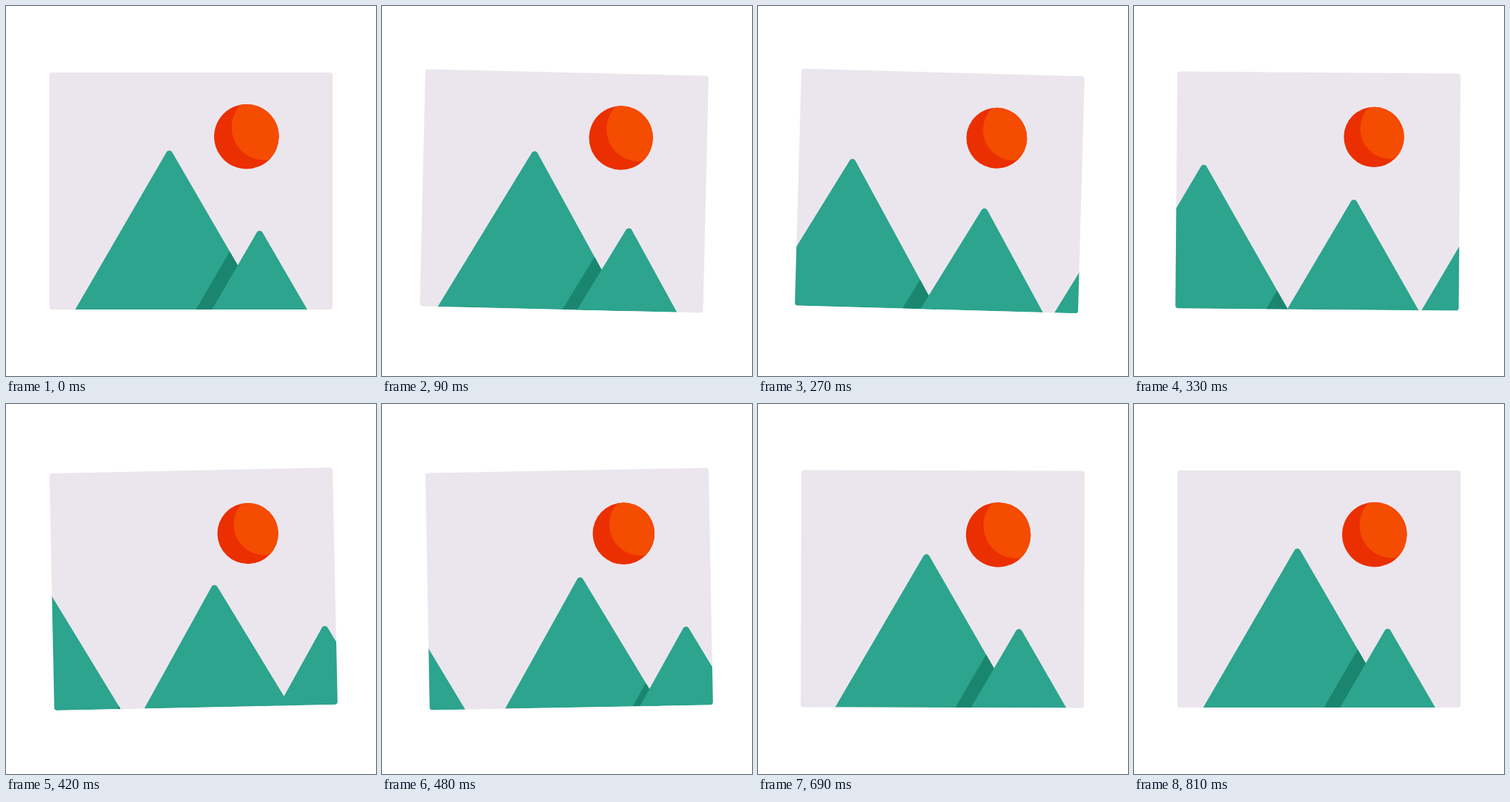
Write an HTML page with a canvas that moves like this. It is 512 px wide and 512 px high and loops after 840 ms.

```html
<!DOCTYPE html>
<html lang="en">
<head>
<meta charset="utf-8">
<title>Gallery icon</title>
<style>
  html, body { margin: 0; width: 100%; height: 100%; overflow: hidden; background: #fff; }
  canvas { display: block; }
</style>
</head>
<body>
<canvas id="stage" width="512" height="512"></canvas>
<script>
const ctx = document.getElementById('stage').getContext('2d');

const LOOP = 840, STEP = 30, TRAVEL = 810;
const CARD = { x: 60, y: 92, w: 392, h: 328 };
const BASE = CARD.y + CARD.h;
const SLOPE = 0.58; // half width per unit of height
const GREEN = '#2ca48e', SHADE = '#1b866f';
const BIG = { x: 226, h: 224.5 }, SMALL = { x: 351, h: 113.5 };

const clamp = v => Math.min(1, Math.max(0, v));
const mix = (a, b, p) => a + (b - a) * p;
const smooth = p => p * p * (3 - 2 * p);

// Timing curve with control points (x1, 0) and (x2, 1).
const bezier = (x1, x2) => p => {
  let lo = 0, hi = 1;
  for (let i = 0; i < 24; i++) {
    const u = (lo + hi) / 2, v = 1 - u;
    if (3 * v * v * u * x1 + 3 * v * u * u * x2 + u * u * u < p) lo = u;
    else hi = u;
  }
  return smooth((lo + hi) / 2);
};

const grow = bezier(0.24, 0.73);

// Keys are [time, value, easing towards this key].
function track(keys, t) {
  for (let i = 1; i < keys.length; i++) {
    const [t0, a] = keys[i - 1], [t1, b, ease = smooth] = keys[i];
    if (t < t1) return mix(a, b, ease((t - t0) / (t1 - t0)));
  }
  return keys[keys.length - 1][1];
}

const TILT = [[0, 0], [235, 1.82, bezier(0.2, 0.1)], [445, -1.32], [585, 0.43], [770, 0]];
const SUN = [[0, 44.8], [330, 41.7], [700, 44.8]];

function peak({ x, h }, dx = 0) {
  const half = h * SLOPE, cx = x - dx;
  ctx.beginPath();
  ctx.moveTo(cx - half, BASE);
  ctx.arcTo(cx, BASE - h, cx + half, BASE, 4.5);
  ctx.lineTo(cx + half, BASE);
  ctx.closePath();
}

// A mountain with the shadow its front neighbour casts on it.
function mountain(m, front, width) {
  peak(m);
  ctx.fillStyle = GREEN;
  ctx.fill();
  if (!front || width <= 0) return;
  ctx.save();
  ctx.clip();
  peak(front, width);
  ctx.fillStyle = SHADE;
  ctx.fill();
  ctx.restore();
}

function disc(x, y, r) {
  ctx.beginPath();
  ctx.arc(x, y, r, 0, Math.PI * 2);
}

function sun(r) {
  const x = 332.8, y = 180.7;
  ctx.save();
  disc(x, y, r);
  ctx.fillStyle = '#eb2f00';
  ctx.fill();
  ctx.clip();
  disc(x + r * 0.55, y - r * 0.285, r * 1.01);
  ctx.fillStyle = '#f44c00';
  ctx.fill();
  ctx.restore();
}

function draw(t) {
  const p = clamp(t / TRAVEL), s = smooth(p), sec = t / 1000;
  const left = { x: BIG.x - 354 * s, h: BIG.h - 58 * s };
  const mid = { x: mix(SMALL.x, BIG.x, s), h: mix(SMALL.h, BIG.h, grow(p)) };
  const right = { x: mix(532, SMALL.x, s), h: SMALL.h };
  const oldShade = 22.3 - 38 * sec + 178 * sec * sec;
  const newShade = 22.3 * (1 - Math.pow(1 - clamp((t - 420) / 390), 3.5));

  ctx.fillStyle = '#fff';
  ctx.fillRect(0, 0, 512, 512);
  ctx.save();

  // The card swings from the middle of its top edge.
  ctx.translate(256, CARD.y);
  ctx.rotate(track(TILT, t) * Math.PI / 180);
  ctx.translate(-256, -CARD.y);

  ctx.beginPath();
  ctx.roundRect(CARD.x, CARD.y, CARD.w, CARD.h, 4);
  ctx.fillStyle = '#ebe6ed';
  ctx.fill();
  ctx.clip();

  sun(track(SUN, t));
  mountain(left, mid, oldShade);
  mountain(mid, right, newShade);
  mountain(right);
  ctx.restore();
}

const start = performance.now();
function tick() {
  const t = (performance.now() - start + 2) % LOOP;
  draw(Math.floor(t / STEP) * STEP);
  requestAnimationFrame(tick);
}
tick();
</script>
</body>
</html>
```
